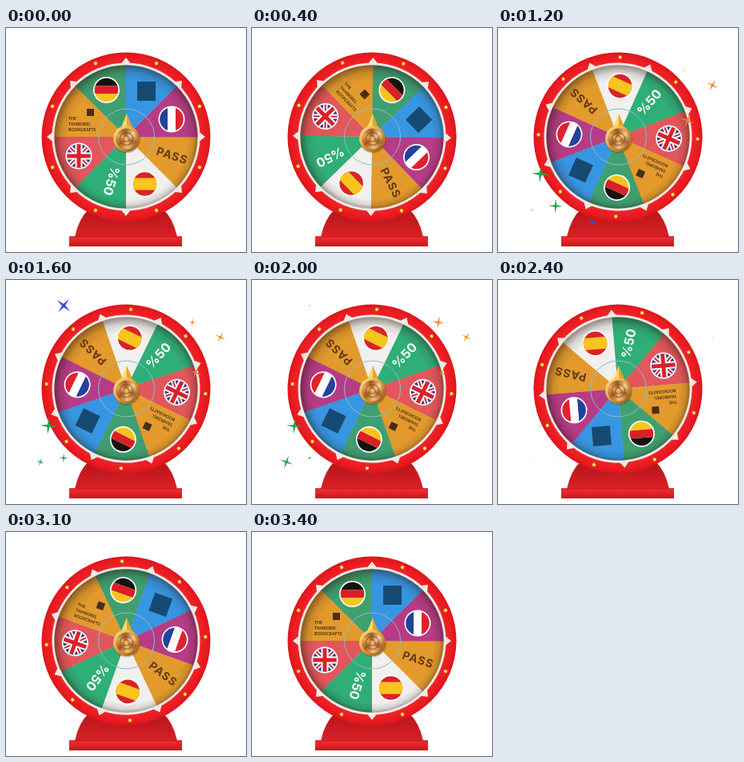
Write an HTML page with a canvas that moves like this. It is 300 by 280 pixels and loops after 4000 ms.

```html
<!DOCTYPE html>
<html lang="en">
<head>
<meta charset="utf-8">
<title>Prize wheel</title>
<style>
html, body { margin: 0; width: 100%; height: 100%; overflow: hidden; background: #fff; }
canvas { display: block; width: 300px; height: 280px; }
</style>
</head>
<body>
<canvas id="stage" width="300" height="280"></canvas>
<script>
const ctx = document.getElementById('stage').getContext('2d');
const TAU = Math.PI * 2, RAD = Math.PI / 180;
const CX = 150, CY = 136, LOOP = 4000;
const TURN = 206, SPIN = 1280, BACK = 2076;
const ORANGE = '#e39a2d', DARK = '#4a2f17';
// slices run clockwise from three o'clock
const SLICES = [ORANGE, '#f1f0ee', '#2fae78', '#e2575b', ORANGE, '#3f9f70', '#3796e2', '#b63c86'];

function circle(x, y, r, fill, stroke, width) {
  ctx.beginPath();
  ctx.arc(x, y, r, 0, TAU);
  if (fill) { ctx.fillStyle = fill; ctx.fill(); }
  if (stroke) { ctx.strokeStyle = stroke; ctx.lineWidth = width; ctx.stroke(); }
}

function poly(points, fill) {
  ctx.beginPath();
  points.forEach(([x, y]) => ctx.lineTo(x, y));
  ctx.closePath();
  ctx.fillStyle = fill;
  ctx.fill();
}

function rect(x, y, w, h, fill) {
  ctx.fillStyle = fill;
  ctx.fillRect(x, y, w, h);
}

function grade(gradient, ...colors) {
  colors.forEach((c, i) => gradient.addColorStop(i / (colors.length - 1), c));
  return gradient;
}

function at(x, y, angle, draw) {
  ctx.save();
  ctx.translate(x, y);
  ctx.rotate(angle);
  draw();
  ctx.restore();
}

function label(text, x, y, font, fill, align = 'center') {
  ctx.font = font;
  ctx.fillStyle = fill;
  ctx.textAlign = align;
  ctx.textBaseline = 'middle';
  ctx.fillText(text, x, y);
}

function flag(x, y, draw) {
  at(x, y, 0, () => {
    circle(0, 0, 16.5, '#fff');
    ctx.beginPath();
    ctx.arc(0, 0, 14.8, 0, TAU);
    ctx.clip();
    draw();
  });
}

function germany() {
  rect(-16, -16, 32, 11, '#15120f');
  rect(-16, -5, 32, 10, '#da1f26');
  rect(-16, 5, 32, 11, '#f6c51c');
}

function france() {
  rect(-16, -16, 11, 32, '#23429a');
  rect(-5, -16, 10, 32, '#fff');
  rect(5, -16, 11, 32, '#e0222f');
}

function spain() {
  rect(-16, -16, 32, 32, '#d8232b');
  rect(-16, -7.5, 32, 15, '#f9c51e');
}

function britain() {
  rect(-16, -16, 32, 32, '#283c86');
  for (const a of [45, 135]) {
    at(0, 0, a * RAD, () => {
      rect(-20, -2.8, 40, 5.6, '#fff');
      rect(-20, -1, 40, 2, '#d8222c');
    });
  }
  for (const [w, c] of [[9, '#fff'], [5, '#d8222c']]) {
    rect(-16, -w / 2, 32, w, c);
    rect(-w / 2, -16, w, 32, c);
  }
}

function publisher() {
  rect(-49, -35, 9, 9, DARK);
  ['THE', 'TAMBOREL', 'BOOKCRAFTS'].forEach((line, i) =>
    label(line, -72, -22.5 + i * 7.2, '700 5.2px Lato, sans-serif', DARK, 'left'));
}

function rim() {
  circle(0, 0, 105.5, grade(ctx.createRadialGradient(0, 0, 89, 0, 0, 105.5),
    '#f23a3b', '#ee2026', '#ea1b21', '#dc161c'));
  for (let i = 0; i < 8; i++) {
    at(0, 0, i * 45 * RAD, () => poly([[89, -8], [99, 0], [89, 8]], '#eeeae4'));
    at(0, 0, (i * 45 + 22.5) * RAD, () => {
      circle(99.5, 0, 2.5, '#c98413');
      circle(99.5, 0, 1.8, '#ffe07a');
    });
  }
  circle(0, 0, 92.5, '#eeeae4');
}

function wheel(angle) {
  at(CX, CY, angle, () => {
    rim();
    SLICES.forEach((color, i) => {
      ctx.beginPath();
      ctx.moveTo(0, 0);
      ctx.arc(0, 0, 89.5, i * 45 * RAD, (i + 1) * 45 * RAD + 0.005);
      ctx.fillStyle = color;
      ctx.fill();
    });
  });
  // the inner shade stays put while the slices turn
  circle(CX, CY, 89.7, grade(ctx.createRadialGradient(CX + 2, CY + 4, 74, CX + 1, CY + 1, 91),
    'rgba(40,20,10,0)', 'rgba(40,20,10,.12)', 'rgba(40,20,10,.48)'));
  at(CX, CY, angle, () => {
    flag(-24.5, -58.5, germany);
    flag(57, -22, france);
    flag(23.5, 59, spain);
    flag(-59, 24, britain);
    rect(14, -69, 23, 24, '#174a73');
    publisher();
    at(57, 24, 18 * RAD, () => {
      ctx.letterSpacing = '1px';
      label('PASS', 0.5, 0, '700 14px Inter, sans-serif', '#633a16');
      ctx.letterSpacing = '0px';
    });
    at(-19, 55, 107 * RAD, () => label('%50', 0, 0, '700 16px Inter, sans-serif', '#fff'));
  });
}

function stand() {
  ctx.beginPath();
  ctx.moveTo(104, 226);
  ctx.quadraticCurveTo(91, 238, 86, 261);
  ctx.lineTo(214, 261);
  ctx.quadraticCurveTo(209, 238, 196, 226);
  ctx.fillStyle = grade(ctx.createLinearGradient(0, 230, 0, 261), '#b9161b', '#d92026');
  ctx.fill();
  rect(79, 260.5, 141, 12.5, grade(ctx.createLinearGradient(0, 261, 0, 273), '#ee3235', '#df2025', '#c9181d'));
  rect(79, 260.5, 141, 1, '#c0161c');
}

function hub() {
  circle(150.5, 136, 35, null, '#8bbdc9', 1);
  poly([[151, 107], [142, 129], [151, 133]], '#f9dc67');
  poly([[151, 107], [160, 129], [151, 133]], '#e5a12c');
  circle(151, 139.5, 17, 'rgba(70,30,10,.25)');
  circle(150.5, 138.5, 16.5, grade(ctx.createLinearGradient(136, 124, 165, 154), '#ffe58a', '#d99a36', '#8f551b'));
  circle(150.5, 138.5, 13, grade(ctx.createConicGradient(0.4, 150.5, 138.5),
    '#a9622a', '#edbf78', '#a45a23', '#e3a757', '#9f5824', '#f3d096', '#a9622a'));
  circle(150.5, 138.5, 8, null, '#8e4f20', 1);
  circle(150.5, 138.5, 3.5, '#e6b062', '#96561f', 0.8);
}

// x, y, colour, size early, size late, extra size between, tilt
const SPARKS = [
  [268, 71.5, '#f08a2c', 7.5, 6.5, 0, 0.5],
  [233, 53, '#f08a2c', 2, 8, 0, 0.15],
  [237, 116, '#ee8128', 9, 5, 0, 0.4],
  [53, 182.5, '#27a550', 11, 10, 0, 0.1],
  [72, 222.5, '#27a550', 9, 3, 0, 0.05],
  [43, 227.5, '#27a550', 2, 8.5, 0, 0.35],
  [118, 243, '#3a4fd8', 6, 0, 0, 0.3],
  [72, 32, '#3a4fd8', 0, 1.5, 10, 0.7]
];

function sparks(t) {
  const clamp = v => Math.max(0, Math.min(1, v));
  const fade = clamp((t - 1000) / 200) * clamp((2450 - t) / 350);
  const a = Math.PI * (t - 1200) / 800;
  for (const [x, y, color, early, late, extra, tilt] of SPARKS) {
    const size = (early + late) / 2 + (early - late) / 2 * Math.cos(a) + extra * Math.sin(a);
    const r = size * fade;
    if (r < 0.3) continue;
    at(x, y, tilt, () => {
      const pts = [];
      for (let i = 0; i < 8; i++) {
        const d = i % 2 ? r * 0.2 : r, b = i * TAU / 8;
        pts.push([d * Math.cos(b), d * Math.sin(b)]);
      }
      poly(pts, color);
    });
  }
}

const ease = u => (1 - Math.cos(Math.PI * Math.max(0, Math.min(1, u)))) / 2;

function frame(now) {
  const t = Math.floor((now % LOOP) / 100) * 100;
  const angle = TURN * (ease(t / SPIN) - ease((t - BACK) / SPIN)) * RAD;
  rect(0, 0, 300, 280, '#fff');
  stand();
  wheel(angle);
  hub();
  sparks(t);
  requestAnimationFrame(frame);
}
requestAnimationFrame(frame);
</script>
</body>
</html>
```
